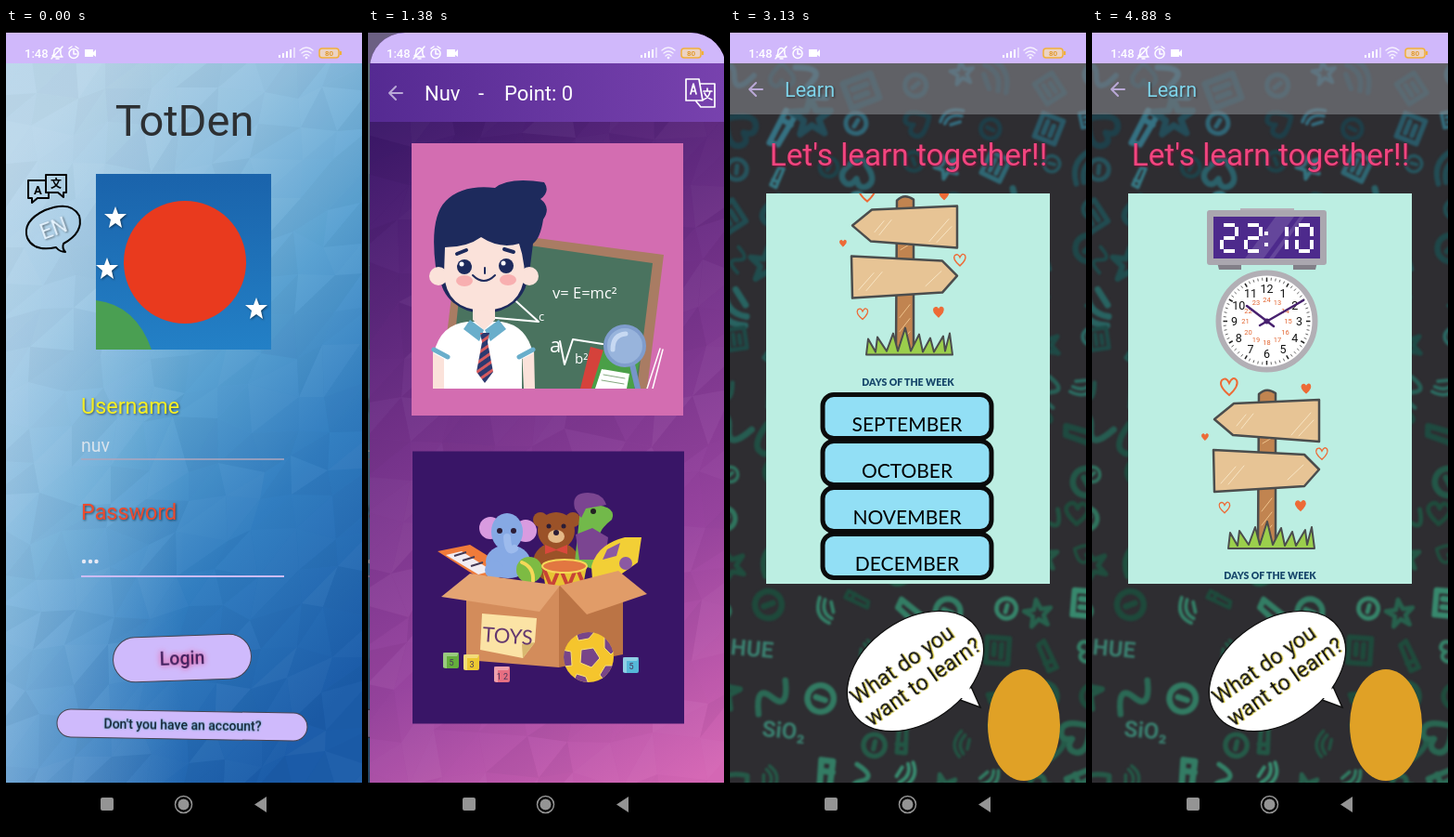
Animation, 384 px wide and 864 px high, one loop 5.01 s. Source, as an HTML page:

```html
<!DOCTYPE html>
<html lang="en">
<head>
<meta charset="utf-8">
<title>Learning app</title>
<style>
html, body { margin: 0; height: 100%; overflow: hidden; background: #000 }
svg { display: block; width: 100vw; height: 100vh; font-family: Roboto, sans-serif }
.mid { text-anchor: middle }
.med { font-weight: 500 }
.line { fill: none; stroke-linecap: round; stroke-linejoin: round }
.shade { filter: drop-shadow(1px 1px 1px #0008) }
.chalk { fill: #fff; font-family: "Open Sans", sans-serif }
</style>
</head>
<body>
<svg viewBox="0 0 384 864">
<defs>
  <clipPath id="frame"><rect y="5" width="384" height="900" rx="38"/></clipPath>
  <clipPath id="list"><rect x="39" y="178" width="306" height="420"/></clipPath>
  <clipPath id="photo"><rect x="97" y="157" width="189" height="189"/></clipPath>
  <clipPath id="class"><rect x="45" y="124" width="293" height="264"/></clipPath>
  <clipPath id="globe"><rect x="107" y="417" width="172" height="171" rx="70"/></clipPath>
  <clipPath id="ball"><circle r="27"/></clipPath>
  <linearGradient id="sky" gradientUnits="userSpaceOnUse" x1="0" y1="150" x2="480" y2="588">
    <stop stop-color="#b4d3e6"/><stop offset=".24" stop-color="#92c1e0"/><stop offset=".47" stop-color="#5aa2d2"/>
    <stop offset=".7" stop-color="#317dc0"/><stop offset="1" stop-color="#1b5ca9"/>
  </linearGradient>
  <linearGradient id="mist"><stop stop-color="#c6dff2" stop-opacity=".42"/><stop offset=".5" stop-color="#c6dff2" stop-opacity="0"/></linearGradient>
  <linearGradient id="plum" gradientUnits="userSpaceOnUse" x1="0" y1="100" x2="384" y2="790">
    <stop stop-color="#3a1768"/><stop offset=".35" stop-color="#6d2f86"/><stop offset=".7" stop-color="#98449f"/><stop offset="1" stop-color="#d466b4"/>
  </linearGradient>
  <linearGradient id="bar"><stop stop-color="#552a92"/><stop offset="1" stop-color="#7842ae"/></linearGradient>
  <linearGradient id="panel" x2="0" y2="1"><stop stop-color="#1a63ab"/><stop offset="1" stop-color="#2380c6"/></linearGradient>
  <pattern id="stripes" width="8" height="8" patternUnits="userSpaceOnUse" patternTransform="rotate(-35)">
    <rect width="8" height="8" fill="#2c3a70"/><rect width="8" height="3" fill="#d65a5e"/>
  </pattern>
  <path id="star" fill="#fff" d="M0-12 3-4 12-4 5 2 7 11 0 6-7 11-5 2-12-4-3-4Z"/>
  <path id="heart" d="M0 9Q-12-1-8-7-3-11 0-4 4-12 8-7 11-1 0 9Z"/>
  <path id="back" class="line" stroke="#b9a8d6" stroke-width="2" d="M35 0H21M28-7 21 0 28 7"/>
  <g id="cube"><rect x="-8" y="-8" width="17" height="17" rx="2"/><path fill="#fff" fill-opacity=".35" d="M-8-8H9L7-4H-4V9L-8 8Z"/></g>
</defs>

<g id="login">
  <rect y="5" width="384" height="807" fill="url(#sky)"/>
  <rect y="5" width="384" height="807" fill="url(#mist)"/>
  <g id="facetsBlue"></g>
  <rect y="5" width="384" height="33" fill="#d0b8fb"/>
  <text class="mid" x="192.500" y="116" font-size="47" fill="#2d3033">TotDen</text>
  <g class="line" stroke="#000" stroke-width="2">
    <path d="M43 164H24V183H28V188L34 183H46V178M43 158H65V177H62V182L56 177H43Z"/>
    <path d="M62 232Q84 220 79 202 70 185 42 196 17 208 23 226 30 241 54 236 58 241 64 241 60 237 62 232Z"/>
  </g>
  <g class="mid" font-weight="700"><text x="34.500" y="179" font-size="13">A</text><text x="54" y="172" font-size="12" font-family="'Noto Sans CJK SC', sans-serif">文</text></g>
  <text class="mid shade" transform="translate(54 223) rotate(-20)" font-size="23" fill="#e6f4ff">EN</text>
  <g clip-path="url(#photo)">
    <rect x="97" y="157" width="189" height="189" fill="url(#panel)"/>
    <path fill="#4a9f52" d="M97 293Q140 298 157 346H97Z"/>
    <g class="shade"><use href="#star" x="118" y="204"/><use href="#star" x="109" y="259"/><use href="#star" x="270" y="302"/></g>
    <circle cx="193" cy="252" r="66" fill="#e93a1e"/>
  </g>
  <g class="shade" font-size="23.400"><text x="81" y="415" fill="#f5ee25">Username</text><text x="81" y="529" fill="#ee4a2d">Password</text></g>
  <text x="81" y="456" font-size="19.500" fill="#d9e3ec">nuv</text>
  <path stroke="#afa6bd" stroke-width="1.500" d="M81 464H300"/>
  <path stroke="#cbbcf2" stroke-width="2" d="M81 590H300"/>
  <g fill="#e6e9f5"><circle cx="84" cy="574" r="2.200"/><circle cx="91" cy="574" r="2.200"/><circle cx="97.500" cy="574" r="2.200"/></g>
  <path id="cursor" stroke="#c9b6ee" stroke-width="2" d="M102 560V586"/>
  <rect id="button" x="115.500" y="654" width="149" height="48" rx="24" stroke="#47434f" transform="rotate(-2 190 678)"/>
  <text class="mid med" x="190" y="685" font-size="19.500" fill="#42205f" transform="rotate(-2 190 678)" style="filter:drop-shadow(0 0 3px #f0407c)">Login</text>
  <g transform="rotate(1 190 750)">
    <rect x="55" y="735" width="270" height="30" rx="15" fill="#cfbafc" stroke="#47434f"/>
    <text class="mid med" x="190.500" y="755" font-size="14" fill="#1b2638" style="filter:drop-shadow(0 0 1px #4ab5c8)">Don't you have an account?</text>
  </g>
  <rect class="dim" width="384" height="812"/>
</g>

<g id="menu">
  <rect y="5" width="384" height="807" fill="url(#plum)"/>
  <g id="facetsPlum"></g>
  <rect y="5" width="384" height="33" fill="#d0b8fb"/>
  <rect y="38" width="384" height="63" fill="url(#bar)"/>
  <use href="#back" y="70"/>
  <g font-size="22" fill="#fff"><text x="59" y="78">Nuv</text><text x="117" y="78">-</text><text x="145" y="78">Point: 0</text></g>
  <path class="line" stroke="#fff" stroke-width="1.700" d="M357 78H341V55H355L359 78ZM357 60H372V85H357L352 79M346 71 349 60 352 71M347 68H351M360 68H369M364 65V68M367 68Q366 75 360 77M361 70Q363 75 369 77"/>
  <rect x="45" y="124" width="293" height="293" fill="#d36db1"/>
  <g clip-path="url(#class)">
    <path fill="#a97c63" d="M97 215 317 244 299 388H76Z"/>
    <path fill="#4a735f" d="M103 224 305 253 288 388H86Z"/>
    <path class="line" stroke="#fff" stroke-width="2" d="M150 287 182 316 125 311M205 337 210 362 219 335 251 340"/>
    <g class="chalk"><text x="197" y="291" font-size="16.500">v= E=mc²</text><text x="182" y="315" font-size="13">c</text><text x="194" y="349" font-size="22">a</text><text x="221" y="361" font-size="15">b²</text></g>
    <path fill="#d5423b" d="M238 343 253 347 240 388H227Z"/>
    <path fill="#4a9f47" d="M252 346 292 354 285 388H239Z"/>
    <path fill="#fff" d="M250 367 280 372 277 388H243Z"/>
    <path class="line" stroke="#84a87f" d="M252 373 275 377M250 379 274 383"/>
    <path class="line" stroke="#fff" stroke-width="1.500" d="M313 345 299 388M316 346 305 388"/>
    <path class="line" stroke="#7795c9" stroke-width="6" d="M283 362 289 388"/>
    <circle cx="275" cy="342" r="21" fill="#98b4dc" stroke="#7f9dcd" stroke-width="4"/>
    <path class="line" stroke="#c7d9f2" stroke-width="5" d="M262 346Q262 330 276 329"/>
    <path fill="#fbe2da" d="M68 345H81V388H68ZM164 345H177L178 388H166Z"/>
    <path fill="#fff" d="M69 350Q76 319 105 316H142Q169 320 176 350L164 356V388H80V356Z"/>
    <path class="line" stroke="#69aecb" stroke-width="5" stroke-linecap="butt" d="M69 346 84 354M161 354 176 346"/>
    <ellipse cx="123" cy="267" rx="47" ry="40" fill="#1d2a5c"/>
    <path fill="#fbe2da" d="M111 295H135V314L123 325 111 314Z"/>
    <path fill="#69aecb" d="M108 314 123 325 118 337 101 324ZM139 314 124 325 130 337 147 324Z"/>
    <path fill="url(#stripes)" d="M119 328H129L127 338 133 370 124 382 115 370 121 338Z"/>
    <path fill="#1d2a5c" d="M72 264Q63 205 82 186 100 168 135 172 150 160 188 166 195 176 184 184 196 193 187 206 184 226 176 232L172 264Z"/>
    <g fill="#fbe2da"><circle cx="74" cy="267" r="10"/><circle cx="172" cy="267" r="10"/>
      <path d="M81 236Q105 236 120 225 140 238 161 232 166 246 167 264 164 303 123 304 82 303 80 264Z"/></g>
    <g fill="#f8afb0"><ellipse cx="102" cy="272" rx="9" ry="6"/><ellipse cx="149" cy="271" rx="9" ry="6"/></g>
    <g fill="#1d2a5c"><circle cx="102" cy="257" r="8"/><circle cx="147" cy="256" r="8"/></g>
    <g fill="#fff"><circle cx="99" cy="254" r="2.500"/><circle cx="144" cy="253" r="2.500"/></g>
    <path class="line" stroke="#1d2a5c" stroke-width="2" d="M111 266Q123 278 135 266M124 258V264"/>
    <path class="line" stroke="#1d2a5c" stroke-width="4" d="M94 243 104 239M145 238 155 241"/>
  </g>
  <rect x="46" y="455.500" width="293" height="293" fill="#391567"/>
  <g>
    <path fill="#f07b3a" d="M73 563 108 556 150 582 118 592Z"/>
    <path fill="#f2edf2" d="M82 567 99 563 132 584 117 588Z"/>
    <path stroke="#443a55" stroke-width="2" d="M91 568 104 564M100 573 113 569M109 579 122 575"/>
    <g fill="#d99be0"><circle cx="130" cy="538" r="12"/><circle cx="168" cy="541" r="12"/></g>
    <g fill="#86a9e4"><ellipse cx="149" cy="574" rx="24" ry="18"/><ellipse cx="148" cy="542" rx="17" ry="20"/><circle cx="134" cy="583" r="10"/></g>
    <path class="line" stroke="#9dbbed" stroke-width="8" d="M148 548Q149 566 156 560"/>
    <g fill="#2b1d36"><circle cx="140" cy="541" r="3"/><circle cx="155" cy="541" r="3"/></g>
    <g fill="#9b5228"><circle cx="184" cy="529" r="8"/><circle cx="219" cy="529" r="8"/><circle cx="201" cy="541" r="20"/><ellipse cx="201" cy="575" rx="25" ry="22"/></g>
    <ellipse cx="201" cy="547" rx="9" ry="7" fill="#e5b987"/>
    <g fill="#2b1d36"><circle cx="201" cy="543" r="3"/><circle cx="193" cy="536" r="2.500"/><circle cx="209" cy="536" r="2.500"/></g>
    <path fill="#d9483c" d="M189 556 201 561 213 556V566L201 562 189 566Z"/>
    <path fill="#72b94a" d="M228 508 249 514Q266 517 261 529 246 540 247 552L240 582 221 575Z"/>
    <path fill="#7b4591" d="M222 545 240 538 257 548 254 572H226ZM221 517Q217 500 235 500 251 500 255 513L233 517 228 527Z"/>
    <circle cx="241" cy="520" r="3" fill="#222"/>
    <path fill="#f2cf36" d="M239 579Q246 555 275 548L293 548 289 575 262 594H240Z"/>
    <path fill="#8b59a3" d="M256 561 270 554 266 568 251 572Z"/><circle cx="276" cy="576" r="7" fill="#8b59a3"/>
    <circle cx="172" cy="583" r="14" fill="#7dbb43"/><path class="line" stroke="#f5d858" stroke-width="4" d="M164 575Q177 580 176 595"/>
    <path fill="#e8c334" d="M186 579H234L229 605H190Z"/><path stroke="#c84236" stroke-width="4" fill="none" d="M187 580 196 602 205 580 214 602 223 580 232 602"/>
    <ellipse cx="210" cy="579" rx="24" ry="7" fill="#e27741" stroke="#f5d858" stroke-width="2"/>
    <path fill="#d38c5b" d="M104 600 204 600V688L104 680Z"/><path fill="#bb7445" d="M204 600 273 592V674L204 688Z"/>
    <path fill="#e4a473" d="M77 612 108 587 205 600 183 628Z"/><path fill="#e19c68" d="M205 600 268 584 299 609 234 631Z"/>
    <path fill="#fbe3a5" d="M121 630 180 635 178 661 165 678 119 669Z"/><path fill="#d8b86f" d="M178 661 165 678 164 663Z"/>
    <text class="mid" x="148.500" y="662" font-size="22" fill="#64386f" font-family="Lato, sans-serif" transform="rotate(4 149 655)">TOYS</text>
    <g transform="translate(236 677)"><circle r="27" fill="#f5c52d"/>
      <path clip-path="url(#ball)" fill="#784589" stroke="#f9e179" d="M-8-8 5-10 12 1 3 11-9 6ZM-14-27 7-28 0-20-11-18ZM17-23 29-8 24-3 17-10ZM18 9 28 9 18 27 12 19ZM-13 18-3 21 0 29-17 27ZM-29-8-19-6-18 9-27 10Z"/></g>
    <use href="#cube" x="87" y="680" fill="#64ae3c"/><use href="#cube" x="109" y="682" fill="#edc932"/>
    <use href="#cube" x="142" y="695" fill="#e66f82"/><use href="#cube" x="281" y="685" fill="#55b7d8"/>
    <g class="mid" font-size="9" fill="#48355a"><text x="88" y="686">5</text><text x="110" y="688">3</text><text x="143" y="701">1 2</text><text x="282" y="690">5</text></g>
  </g>
  <rect class="dim" width="384" height="812"/>
</g>

<g id="learn">
  <rect y="5" width="384" height="807" fill="#2e2d31"/>
  <g id="doodles" class="line" stroke-width="5" style="filter:blur(1.3px)"></g>
  <rect y="5" width="384" height="33" fill="#d0b8fb"/>
  <rect y="38" width="384" height="55" fill="#8b8d92" fill-opacity=".55"/>
  <use href="#back" y="66"/>
  <text x="59" y="74" font-size="21.600" fill="#7fd4ea" class="shade">Learn</text>
  <text class="mid" x="192.500" y="148" font-size="33.300" fill="#f2457f" style="filter:drop-shadow(1px 1px 1px #7a1238)">Let's learn together!!</text>
  <rect x="39" y="178" width="306" height="420" fill="#bceee2"/>
  <g clip-path="url(#list)"><g id="scroll">
    <path fill="#827f88" d="M135 252H161V260H137ZM217 252H243L241 260H217Z"/>
    <path fill="#b5b1b9" d="M160 194H218V198H160Z"/>
    <rect x="124" y="196" width="129" height="59" rx="3" fill="#aaa7af"/>
    <rect x="131" y="203" width="115" height="45" fill="#4d2a8c"/>
    <path fill="#fff" fill-opacity=".13" d="M198 203H218L185 248H165ZM224 203H229L196 248H191Z"/>
    <g id="digits" stroke="#fff" stroke-width="4"></g>
    <circle cx="188.500" cy="315.500" r="52" fill="#fff" stroke="#b2afb5" stroke-width="6"/>
    <g id="dial" class="mid"></g>
    <path class="line" stroke="#47206f" stroke-width="2.500" d="M167 299 196 321M181 320 228 293"/><circle cx="188.500" cy="315.500" r="3" fill="#47206f"/>
    <g class="line" stroke="#4b4d4d" stroke-width="2.500">
      <path fill="#c18450" d="M180 394Q188 386 198 393V557H179Z"/>
      <path stroke="#efc38c" stroke-width="1" d="M184 447 194 441M183 520 194 506M183 535 194 521M183 548 194 535"/>
      <path fill="#e7c495" d="M132 421 153 404 245 400V445L152 438ZM131 454 229 459 245 475 229 493 132 499Z"/>
      <path stroke="#f8e5c4" stroke-width="1" d="M156 428 166 416M161 431 174 415M215 438 236 414M223 439 239 422M139 490 155 472M147 491 164 471M211 486 228 470"/>
      <path stroke-width="2" fill="#9bcf4c" d="M147 560 149 543 157 557 159 541 169 556 176 537 181 556 189 531 195 556 204 538 208 557 216 542 220 557 230 540 232 556 237 537 240 560Z"/>
    </g>
    <g fill="none" stroke="#ed6a36" stroke-width="2" id="hearts"></g>
    <text class="mid" x="192" y="593" font-size="10.500" font-weight="900" fill="#18486c" font-family="Lato, sans-serif">DAYS OF THE WEEK</text>
    <g id="months" class="mid" font-size="21" font-family="Lato, sans-serif"></g>
    <g transform="translate(0 604)">
      <g fill="#6b3b9b" stroke="#2c1b3c" stroke-width="1.500"><path id="leg" d="M127 402Q129 388 148 388 163 388 165 381V350H175V402Z"/><use href="#leg" transform="matrix(-1 0 0 1 381 0)"/></g>
      <g id="cross"></g>
      <path fill="#fff" stroke="#33291a" stroke-width="1.500" d="M167 296Q192 300 216 290 217 319 192 321 171 319 167 296ZM173 308Q193 309 212 303M183 298 184 307M200 297 202 306"/>
      <path class="line" stroke="#33291a" stroke-width="2" d="M160 291Q163 294 170 296M214 289 219 284M166 279Q174 271 181 279M198 276Q206 268 213 275M169 270Q174 264 179 267M199 265Q205 261 209 264"/>
      <g clip-path="url(#globe)">
        <path fill="#a9e1ef" d="M107 417H193V498H107Z"/><path fill="#9fe5e5" d="M193 417H280V498H193Z"/>
        <path fill="#d8cff1" d="M107 498H193V590H107Z"/><path fill="#f8e3cb" d="M193 498H280V590H193Z"/>
        <path fill="#b7a5da" d="M107 563 148 528 193 570V590H107Z"/><path fill="#edaa5c" d="M193 563Q235 540 280 553V590H193Z"/>
        <path fill="#3e7c68" d="M193 427Q168 425 162 446 133 448 132 469 114 480 126 498H193Z"/>
        <path fill="#548841" d="M193 425Q220 423 226 441 256 444 256 466 275 478 268 498H193Z"/>
        <path fill="#6b4b93" d="M126 498Q129 516 151 514 166 535 193 528V498Z"/>
        <path fill="#df7430" d="M193 498H271Q269 519 244 519 231 535 193 527Z"/>
        <path class="line" stroke="#fff" stroke-width="5" d="M134 505Q145 499 157 508L176 506"/>
        <g fill="#f2b52f"><circle cx="216" cy="535" r="9"/><circle cx="238" cy="538" r="12"/></g>
        <path fill="#955238" d="M189 455H199L198 480 214 469 202 494 202 570 207 590H184L190 570V500L174 488 189 491Z"/>
        <path stroke="#8f4f38" stroke-width="2" d="M216 538V555M238 540V556"/>
        <g id="garden"></g>
        <circle cx="252" cy="443" r="6" fill="#f8d846"/>
        <path stroke="#e8f7f5" stroke-width="2" d="M107 498H280M193 417V590"/>
      </g>
      <g id="rainbow" fill="none" stroke-width="3"></g>
    </g>
  </g></g>
  <path fill="#fff" stroke="#111" stroke-width="1.500" d="M240 720 270 731 257 702Z"/>
  <ellipse rx="81" ry="55" fill="#fff" stroke="#111" stroke-width="1.300" transform="translate(200 692) rotate(-35)"/>
  <path fill="#fff" d="M238 718 262 724 256 701Z"/>
  <g class="mid" transform="translate(200 692) rotate(-35)" font-size="23.500" fill="#111" style="filter:drop-shadow(1px 1px 0 #ded044)"><text x="-8" y="-6">What do you</text><text x="0" y="22">want to learn?</text></g>
  <ellipse cx="317" cy="750" rx="39" ry="60" fill="#e0a126"/>
</g>

<rect width="384" height="5"/><rect y="812" width="384" height="52"/>
<g fill="#fff">
  <text class="med" x="20" y="32" font-size="13">1:48</text>
  <path class="line" stroke="#fff" stroke-width="1.500" d="M50 30Q52 29 52 24 55 19 59 24 58 29 61 31H52M54 33H57M49 33 61 20M68 22 71 20M75 20 78 22M73 24V28H76"/>
  <circle cx="73" cy="27.500" r="5" fill="none" stroke="#fff" stroke-width="1.500"/>
  <path d="M85 23H94V26L97 23V31L94 29V31H85Z"/>
  <path d="M294 29H296V32H294ZM298 27H300V32H298ZM302 25H304V32H302ZM306 23H308V32H306Z"/><path opacity=".5" d="M310 21H312V32H310Z"/>
  <path class="line" stroke="#fff" stroke-width="1.300" opacity=".8" d="M317 24Q324 18 331 24M319 27Q324 23 329 27M321 30Q324 27 327 30"/><circle cx="324" cy="32" r="1.300"/>
  <rect x="338" y="22" width="21" height="10" rx="3" fill="#ecd3c4" stroke="#f1b03a" stroke-width="1.500"/><path fill="#f1b03a" d="M360 25H362V29H360Z"/>
  <text class="mid med" x="348.500" y="30" font-size="8" fill="#e0941c">80</text>
</g>
<g fill="#949494"><rect x="102" y="828" width="14" height="14" rx="2"/><circle cx="191.500" cy="835.500" r="6"/><circle cx="191.500" cy="835.500" r="9" fill="none" stroke="#949494" stroke-width="1.500"/><path d="M268 835.500 281 827V844Z"/></g>
</svg>
<script>
const $ = id => document.getElementById(id);
const fill = (id, html) => { $(id).innerHTML = html; };
const times = (n, f) => Array.from({ length: n }, (_, i) => f(i)).join('');

let seed = 7;
const rnd = () => (seed = seed * 16807 % 2147483647) / 2147483647;

// Low-poly texture: a jittered grid, each cell split into two faint triangles.
function facets(id, size, strength) {
  const cols = Math.ceil(384 / size) + 2, rows = Math.ceil(774 / size) + 2;
  const pts = Array.from({ length: cols * rows }, (_, i) => [
    (i % cols - .5 + rnd() * .5) * size, 38 + (Math.floor(i / cols) - .5 + rnd() * .5) * size].map(Math.round));
  const tri = (...p) => `<path d="M${p.map(i => pts[i]).join('L')}Z" fill="${rnd() < .5 ? '#fff' : '#002'}" fill-opacity="${(rnd() * strength).toFixed(3)}"/>`;
  fill(id, times(cols * (rows - 1), i => i % cols == cols - 1 ? '' :
    tri(i, i + 1, i + cols) + tri(i + 1, i + cols, i + cols + 1)));
}
facets('facetsBlue', 40, .035);
facets('facetsPlum', 46, .04);

const shapes = [
  'M-11 0A11 11 0 1 0 11 0A11 11 0 1 0-11 0M-4 0H4',
  'M-16 8Q-8-16 0 0T16-8',
  'M-12-10H12V11H-12ZM-6-3H6M-6 4H4',
  'M0 13Q-20-3-9-10Q-3-13 0-5Q4-14 10-9Q18-2 0 13Z',
  'M-15 12Q-14-12 13-13M-8 13Q-6-4 13-5M1 12L13 4',
  'M0-15L4-4H15L6 3L9 14L0 7L-9 14L-6 3L-15-4H-4Z',
  'M-13 12L6-13L13-7L-6 15ZM1-6L8 0'];
const word = (x, y, s) => `<text x="${x}" y="${y}" font-size="24" font-weight="700" fill="#3a7f6f" transform="rotate(5 ${x} ${y})">${s}</text>`;
fill('doodles', times(153, i => {
  const x = i % 9 * 48 + rnd() * 22 - 10, y = 48 + Math.floor(i / 9) * 47 + rnd() * 20;
  const hue = 202 - 42 * Math.min(1, y / 520), light = 20 + rnd() ** 2 * 18;
  const path = shapes[Math.floor(rnd() * shapes.length)], turn = rnd() * 360;
  const nearWord = x < 112 && (Math.abs(y - 663) < 24 || Math.abs(y - 755) < 26);
  return nearWord ? '' : `<path d="${path}" stroke="hsl(${hue} 42% ${light}%)" transform="translate(${x} ${y}) rotate(${turn}) scale(${.7 + rnd() * .7})"/>`;
}) + word(0, 674, 'HUE') + word(34, 762, 'SiO₂'));

// Seven-segment digits; bits run top, upper right, lower right, bottom, lower left, upper left, middle.
const segments = ['M2 0H14', 'M16 2V12', 'M16 16V26', 'M14 28H2', 'M0 26V16', 'M0 12V2', 'M2 14H14'];
const digit = (x, bits) => `<path transform="translate(${x} 212)" d="${segments.filter((_, i) => bits >> i & 1).join('')}"/>`;
fill('digits', digit(140, 91) + digit(166, 91) + digit(194, 6) + digit(221, 63) + '<path d="M188 219V223M188 231V235"/>');

const polar = (r, hour) => [188.5 + r * Math.sin(hour * Math.PI / 6), 315.5 - r * Math.cos(hour * Math.PI / 6)];
const label = (r, h, s, size, color) => {
  const [x, y] = polar(r, h);
  return `<text x="${x}" y="${y + size * .36}" font-size="${size}" fill="${color}">${s}</text>`;
};
fill('dial', times(60, i => `<path stroke="#222" stroke-width="${i % 5 ? .7 : 1.5}" d="M${polar(i % 5 ? 44 : 42.5, i / 5)}L${polar(47, i / 5)}"/>`)
  + times(12, i => label(35, i + 1, i + 1, 12.5, '#111') + label(23, i + 1, i + 13, 7.5, '#e2642f')));

const heart = (x, y, s, solid) => `<use href="#heart" fill="${solid ? '#ed6a36' : 'none'}" transform="translate(${x} ${y}) scale(${s})"/>`;
fill('hearts', heart(148, 386, 1) + heart(231, 388, .55, 1) + heart(122, 440, .4, 1)
  + heart(248, 458, .7) + heart(143, 516, .65) + heart(225, 514, .6, 1));

fill('months', ['SEPTEMBER', 'OCTOBER', 'NOVEMBER', 'DECEMBER'].map((m, i) =>
  `<rect x="100" y="${603 + i * 50}" width="182" height="47" rx="12" fill="#92dff5" stroke="#0b0b0b" stroke-width="5"/><text x="191" y="${642 + i * 50}">${m}</text>`).join(''));

const arms = style => [45, -45].map(a => `<rect x="94" y="270" width="194" height="52" rx="7" transform="rotate(${a} 191 296)" ${style}/>`).join('');
fill('cross', arms('fill="none" stroke="#28251a" stroke-width="3"') + arms('fill="#fcdc1b"'));

const dots = (n, x, y, w, h, r, color) => times(n, () => `<circle cx="${x + rnd() * w}" cy="${y + rnd() * h}" r="${r}" fill="${color}"/>`);
fill('garden', dots(9, 135, 438, 50, 50, 4, '#fff') + dots(8, 135, 440, 50, 50, 2, '#f4d95b')
  + dots(20, 200, 436, 55, 55, 2.5, '#6d9c4d') + dots(12, 203, 502, 55, 16, 3, '#f49a40')
  + dots(20, 114, 562, 75, 24, 1.8, '#8465ae') + dots(10, 198, 565, 65, 20, 2, '#d4712f') + dots(6, 245, 515, 30, 35, 1.8, '#e66835'));
fill('rainbow', ['#ee6352', '#f5a23c', '#f5df54', '#71bf62', '#58a8dc'].map((c, i) =>
  `<path stroke="${c}" d="M${115 + i * 3} 462A${20 - i * 3} ${20 - i * 3} 0 0 1 ${155 - i * 3} 462"/>`).join(''));

const LOOP = 5010;
// Share of a page slide still to go: critically damped, 1 down to 0.
const remaining = (ms, start) => {
  const k = Math.max(0, ms - start) * .0155;
  return (1 + k) * Math.exp(-k);
};
const smooth = (ms, a, b) => {
  const p = Math.min(1, Math.max(0, (ms - a) / (b - a)));
  return p * p * (3 - 2 * p);
};

function place(id, x, covered, entering) {
  const page = $(id), dim = page.querySelector('.dim');
  page.setAttribute('transform', `translate(${x} 0)`);
  page.style.display = x >= 384 || covered === 1 ? 'none' : '';
  if (entering) page.setAttribute('clip-path', 'url(#frame)');
  else page.removeAttribute('clip-path');
  if (dim) dim.setAttribute('opacity', .48 * covered);
}

function draw(now) {
  // The picture advances eight times a second.
  const ms = Math.floor(Math.floor(now % LOOP / 10) / 12.5) * 125;
  const menuX = Math.round(384 * remaining(ms, 880)), learnX = Math.round(384 * remaining(ms, 2413));
  const behind = x => 1 - x / 384;
  place('login', -96 * behind(menuX), behind(menuX), false);
  place('menu', menuX - 96 * behind(learnX), behind(learnX), menuX > 0);
  place('learn', learnX, 0, learnX > 0);
  $('cursor').style.display = Math.floor(ms / 500) % 2 ? '' : 'none';
  $('button').setAttribute('fill', ms >= 750 && ms < 1130 ? '#b59be0' : '#cfbafc');
  const scroll = 604 * (smooth(ms, 2880, 3500) - smooth(ms, 3880, 4700));
  $('scroll').setAttribute('transform', `translate(0 ${-scroll})`);
}

let origin;
function tick(now) {
  origin ??= now;
  draw(now - origin);
  requestAnimationFrame(tick);
}
draw(0);
requestAnimationFrame(tick);
</script>
</body>
</html>
```
